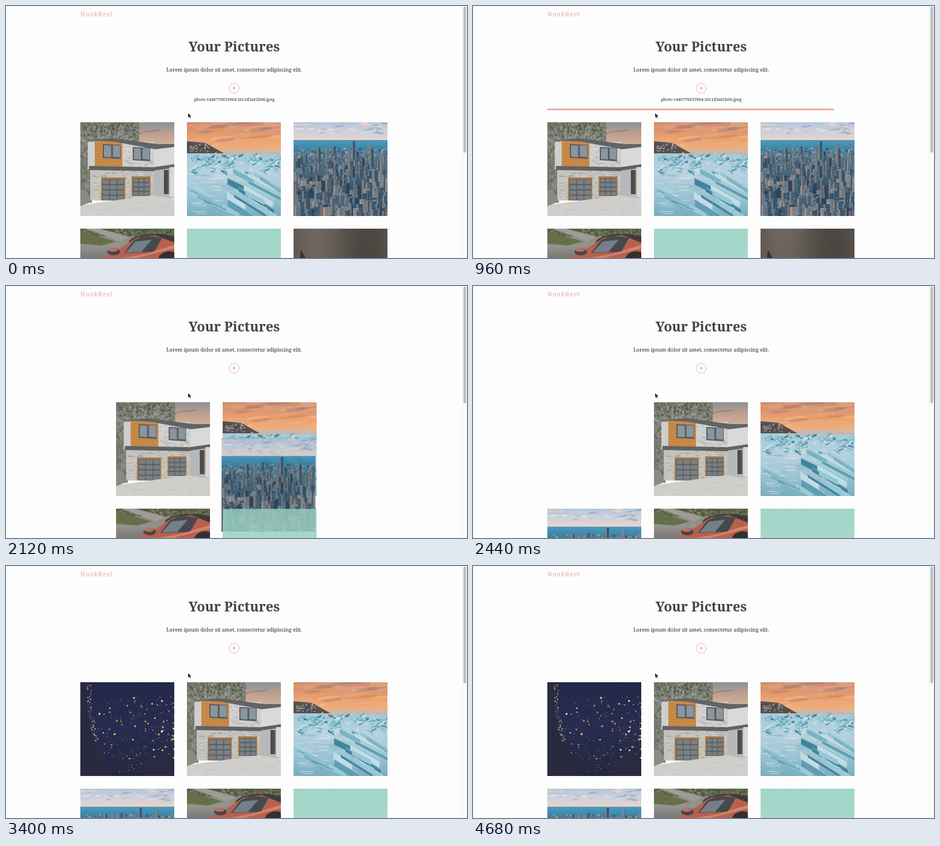
Animation of 800 by 438 pixels, one loop 4.72 s. Source, as an HTML page with a canvas:

```html
<!DOCTYPE html>
<html lang="en">
<head>
<meta charset="utf-8">
<title>Your Pictures</title>
<style>
  html, body { margin: 0; width: 100%; height: 100%; overflow: hidden; background: #fdfdfd; }
  canvas, svg { position: absolute; left: 0; top: 0; display: block; }
  text { font-family: "Noto Serif", serif; fill: #262626; }
</style>
</head>
<body>
<canvas id="stage" width="800" height="438"></canvas>
<svg width="800" height="438" viewBox="0 0 800 438">
  <text x="129" y="17.8" font-size="10.66" letter-spacing="1.11" style="fill:#e5aaa7">NookReel</text>
  <g text-anchor="middle">
    <text x="396" y="78.6" font-size="23.1" font-weight="700" style="fill:#424242">Your Pictures</text>
    <text x="396" y="114" font-size="8.92">Lorem ipsum dolor sit amet, consectetur adipiscing elit.</text>
    <text id="file" x="396" y="164.8" font-size="7.12">photo-1446776653964-20c1d3a81b06.jpeg</text>
  </g>
  <g fill="none" stroke="#e5aaa6">
    <circle cx="396" cy="142.8" r="8.7" stroke-width=".9"/>
    <path d="M393 142.8h6m-3-3v6" stroke-width="1.3"/>
  </g>
  <rect id="bar" x="129" y="178.4" height="2.8" fill="#eaa5a4"/>
  <path d="M792 0h8v438h-8z" fill="#fafafa"/>
  <path d="M791.5 0v438" stroke="#ececec" stroke-width=".7"/>
  <rect id="thumb" x="793.7" y="1" width="4.8" rx="2.4" fill="#bfbfbf"/>
  <path d="M316 186v8.2l1.9-1.7 1.4 3 1.4-.6-1.4-2.9h2.6z" fill="#111" stroke="#fff" stroke-width=".4"/>
</svg>
<script>
const LOOP = 4720, ADDED = 2003.5, SIZE = 163, FULL = 533;
const $ = id => document.getElementById(id);
const ctx = $('stage').getContext('2d');

let seed = 7;
const rand = () => (seed = seed * 16807 % 2147483647) / 2147483647;
const between = (a, b) => a + rand() * (b - a);
const pick = list => list[Math.floor(rand() * list.length)];
const repeat = (n, draw) => { for (let i = 0; i < n; i++) draw(i, i / n); };

// Offscreen photo with a few drawing helpers
function photo(draw) {
  const canvas = document.createElement('canvas');
  canvas.width = canvas.height = SIZE;
  const g = canvas.getContext('2d');
  const shape = (color, d) => { g.fillStyle = color; g.fill(new Path2D(d)); };
  // Upright panel whose top and bottom edges run at a slope
  const panel = (color, x, y, w, h, slope = 0) =>
    shape(color, `M${x} ${y}l${w} ${w * slope}v${h}l${-w} ${-w * slope}z`);
  const blob = (color, x, y, rx, ry = rx, turn = 0) => {
    g.fillStyle = color;
    g.beginPath();
    g.ellipse(x, y, rx, ry, turn, 0, 7);
    g.fill();
  };
  // Gradient over the full width, downwards from y
  const fade = (y, h, ...colors) => {
    const grad = g.createLinearGradient(0, y, 0, y + h);
    colors.forEach((color, i) => grad.addColorStop(i / (colors.length - 1), color));
    panel(grad, 0, y, SIZE, h);
  };
  const clouds = (n, h, rx, ry, colors) =>
    repeat(n, () => blob(pick(colors), rand() * SIZE, rand() * h, between(.3, 1) * rx, between(.3, 1) * ry, -.1));
  const scatter = (n, x, y, w, h, maxW, maxH, colors) =>
    repeat(n, () => panel(pick(colors), x + rand() * w, y + rand() * h, between(.4, 1) * maxW, between(.4, 1) * maxH));
  draw({ shape, panel, blob, fade, clouds, scatter });
  return canvas;
}

const night = photo(({ shape, blob, fade, scatter }) => {
  fade(0, SIZE, '#24284a', '#272c50', '#25273f');
  shape('#2a2a3f', 'M0 0H14L12 70 55 163H0z');
  shape('#2a2a40', 'M163 128Q100 120 110 163H163z');
  scatter(130, 20, 0, 110, 130, 5, 2, ['#2d335855', '#1f234055']);
  const gold = ['#d9ae62', '#f0cf86', '#b98d55', '#ffe9b5', '#8d7258'];
  repeat(360, () => {
    const x = SIZE - 135 * rand() ** 1.9;
    blob(pick(gold), x, between(36 - x * .1, 134), .25 + rand() ** 4 * 1.7);
  });
  repeat(70, (i, k) => blob(pick(gold), 11 + 14 * k * k + rand() * 8, 4 + 100 * k, between(.3, 1.2)));
  repeat(35, () => blob(pick(gold), between(45, 110), between(110, 160), between(.3, .7)));
});

const house = photo(({ shape, panel, fade, clouds, scatter }) => {
  fade(0, 50, '#8f9196', '#c7a48f', '#d0beb0');
  clouds(24, 26, 20, 2, ['#7f8087aa', '#d49a76aa', '#77757caa']);
  panel('#777a70', 0, 0, 20, 140);
  panel('#777a70', 20, 0, 82, 36);
  scatter(420, 0, 0, 98, 32, 4, 5, ['#555c4d', '#82877a', '#9a9d94', '#666d5c']);
  scatter(110, 0, 30, 14, 100, 4, 5, ['#656b5c', '#8a8c80', '#999288']);

  // Upper floor
  panel('#cfcfcd', 13, 34, 115, 48);
  panel('#dadada', 128, 46, 35, 34, -.1);
  scatter(110, 73, 40, 50, 38, 7, 1.5, ['#b4b3b0', '#dededc', '#c5c2bd']);
  panel('#cb8c48', 25, 33, 48, 44);
  repeat(9, i => panel('#b57b3c', 25, 37 + i * 4.5, 48, .7, .02));
  const glass = (x, y, w, h) => {
    panel('#565b60', x, y, w, h, .06);
    repeat(2, i => panel('#8b979e', x + 2 + i * w / 2, y + 2, w / 2 - 3, h - 4, .06));
  };
  glass(39, 38, 31, 24);
  glass(91, 43, 30, 23);
  shape('#626365', 'M10 31L58 28 134 38H163V43L130 47 60 34z');

  // Ground floor
  panel('#c4c3bf', 17, 82, 110, 54);
  scatter(280, 18, 84, 104, 50, 8, 1.6, ['#b3b2ae', '#dad9d6', '#cbc6bd', '#a3a19d']);
  panel('#b8b9bb', 127, 80, 36, 52);
  panel('#606163', 15, 76, 113, 7, .02);
  panel('#606163', 128, 78, 35, 6, -.14);
  const garage = (x, y, w, h) => {
    panel('#b47a43', x - 2, y - 3, w + 4, h + 3);
    panel('#595d60', x, y, w, h);
    repeat(12, i => panel('#7b8185', x + 1 + i % 3 * w / 3, y + 1 + (i >> 2) * 0 + Math.floor(i / 3) * h / 4, w / 3 - 1.5, h / 4 - 2));
  };
  garage(38, 99, 38, 37);
  garage(91, 97, 29, 31);
  panel('#494d50', 145, 83, 7, 42);
  panel('#8d6a4b', 152, 83, 2, 42);
  panel('#d8d8d8', 155, 78, 8, 52);

  // Driveway and verge
  shape('#d0cfcb', 'M0 144L125 127 163 133V163H0z');
  shape('#8a8c80', 'M0 118H10L20 138 0 146z');
  scatter(90, 10, 140, 150, 22, 14, 1, ['#bdbcb888', '#dddcd988']);
});

const ice = photo(({ shape, panel, fade, clouds, scatter }) => {
  fade(0, 55, '#c98c75', '#eca06c', '#f2b785');
  clouds(40, 44, 30, 4, ['#e6b08d66', '#a9776d66', '#f5a45f66', '#f6c79a66']);
  fade(52, 111, '#a4cbd8', '#b9d3df', '#9fc6d5', '#79adc0');
  shape('#cbb8ab', 'M40 53L75 47 163 49V56H40z');
  shape('#554f50', 'M0 33L32 36 64 54H0z');
  scatter(60, 1, 37, 36, 14, 4, 1.5, ['#a59a96', '#2f3035', '#d0c4bd']);
  const shard = (x, y, length, width, slope) => {
    panel(pick(['#5d9fb5', '#79b5c6', '#3f859d', '#98c8d5', '#c4dde5']), x, y, length, width, slope);
    panel('#d2e6ecbb', x, y, length, 1, slope);
  };
  // Rubble along the horizon, then long slabs in the foreground
  repeat(150, () => shard(rand() * SIZE, between(55, 84), between(3, 12), between(1, 5), between(-.9, .8)));
  scatter(90, 0, 88, 90, 70, 26, 2.5, ['#a5c6d566', '#d3e3ea99', '#86b1c566']);
  repeat(16, (i, k) => shard(between(60, 130), 80 + 66 * k, between(24, 62), between(5, 13), between(.45, .7)));
  repeat(5, i => shard(i * 12 - 6, 106 + i * 9, between(30, 45), between(5, 10), .45));
});

const city = photo(({ panel, fade, clouds, scatter }) => {
  fade(0, 32, '#b5cade', '#ccd1dd', '#ecd5ca');
  clouds(45, 20, 11, 1.8, ['#e5dfe3', '#a3b1c8', '#ead1c9', '#bfc3d1']);
  fade(31, 32, '#4d9bbd', '#3b86a8', '#477e98');
  fade(56, 107, '#58778b', '#3f5a6e', '#324c60');
  const tower = (x, y, w, h) => {
    panel(pick(['#2f485d', '#3d596e', '#54697a', '#71808b', '#8d8f92', '#3a5f79']), x, y, w, h);
    panel(pick(['#c19c8899', '#a8908699', '#8797a099']), x, y, w * .3, h);
    for (let r = y + 2; r < y + h; r += 3) panel('#24394c66', x + w * .3, r, w * .7, 1);
  };
  scatter(200, 0, 44, SIZE, 18, 5, 4, ['#64798a', '#a69c98', '#3f5d71', '#7f8b93']);
  repeat(8, (i, k) => tower(42 + 105 * k, between(38, 54), 5, 40));
  tower(101, 33, 6, 40);
  tower(131, 36, 4, 40);
  repeat(190, (i, k) => tower(rand() * SIZE, 56 + 100 * k, between(3, 7) + k * 7, between(10, 22) + k * 14));
  scatter(320, 0, 60, SIZE, 103, 1.6, 1.6, ['#d9a57b', '#c3cbd0', '#1f3546', '#1f3546']);
});

const car = photo(({ shape, panel, blob, fade, scatter }) => {
  fade(0, 60, '#85827b', '#969490', '#6e6a66');
  panel('#596147', 0, 0, SIZE, 13);
  scatter(260, 0, 0, SIZE, 12, 5, 2.5, ['#454d38', '#72795a', '#5a6348', '#8a8b70']);
  shape('#a09c96', 'M10 0H34L86 14 70 22z');
  shape('#65704b', 'M0 4L62 22 36 29 0 26z');
  blob('#3d3b39', 130, 24, 46, 15);
  shape('#b9604f', 'M12 60L54 44 98 15 130 11 163 24V163H12z');
  shape('#44494c', 'M92 21Q110 8 142 16L128 40 76 42z');
  shape('#75808a', 'M79 41L96 22 124 19 106 40z');
  shape('#d48670', 'M30 58L112 44 163 28V34L80 55z');
  blob('#44464a', 58, 40, 11, 6);
  blob('#c66c59', 57, 37, 8, 3);
  blob('#33302f', 154, 54, 19, 15);
});

const teal = photo(({ fade }) => fade(0, SIZE, '#a3d6c9', '#acdacf', '#b0dcd2'));

const dusk = photo(({ panel, fade, shape }) => {
  fade(0, SIZE, '#6f6760', '#655d56');
  repeat(SIZE, x => panel(`rgba(50, 46, 42, ${.28 - .28 * Math.sin(x / 28 + .2)})`, x, 0, 1, SIZE));
  shape('#37332f', 'M12 37Q21 41 60 163H8z');
});

const album = [house, ice, city, car, teal, dusk];
const slot = i => [129 + i % 3 * 185, 202 + Math.floor(i / 3) * 185.3];
const clamp = v => Math.min(1, Math.max(0, v));

// cubic-bezier(.4, 0, .1, 1), solved by bisection
function ease(x) {
  let lo = 0, hi = 1, s = .5;
  repeat(24, () => {
    s = (lo + hi) / 2;
    const u = 1 - s;
    if (1.2 * u * u * s + .3 * u * s * s + s ** 3 < x) lo = s; else hi = s;
  });
  return s * s * (3 - 2 * s);
}

// Unit step of a spring with stiffness 550 and damping 30
function spring(ms) {
  if (ms <= 0) return 0;
  const s = ms / 1000, w = Math.sqrt(325);
  return 1 - Math.exp(-15 * s) * (Math.cos(w * s) + 15 / w * Math.sin(w * s));
}

// Upload in chunks that double in size until the rest fits: [time, share added]
const chunks = [[250, .106], [483, .214], [690, .42], [880, .26]];

// Slightly translucent: what lies below darkens the photo
function place(image, x, y, opacity = 1) {
  ctx.globalAlpha = .8 * opacity;
  ctx.fillStyle = '#fff';
  ctx.fillRect(x, y, SIZE, SIZE);
  ctx.globalAlpha = opacity;
  ctx.globalCompositeOperation = 'multiply';
  ctx.drawImage(image, x, y);
  ctx.globalCompositeOperation = 'source-over';
  ctx.globalAlpha = 1;
}

function render() {
  const t = performance.now() % LOOP;
  const uploading = t < ADDED;
  const move = ease(clamp((t - ADDED) / 450));
  const shown = clamp((t - ADDED - 1000) / 300);

  ctx.fillStyle = '#fdfdfd';
  ctx.fillRect(0, 0, 800, 438);
  if (shown) place(night, ...slot(0), shown);
  album.forEach((image, i) => {
    const [x, y] = slot(i), [x2, y2] = slot(i + 1);
    place(image, x + (x2 - x) * move, y + (y2 - y) * move);
  });

  const progress = chunks.reduce((sum, [at, share]) => sum + share * spring(t - at), 0);
  $('bar').setAttribute('width', uploading ? FULL * progress : 0);
  $('file').style.display = uploading ? '' : 'none';
  $('thumb').setAttribute('height', uploading ? 254 : 203);
  requestAnimationFrame(render);
}
render();
</script>
</body>
</html>
```
